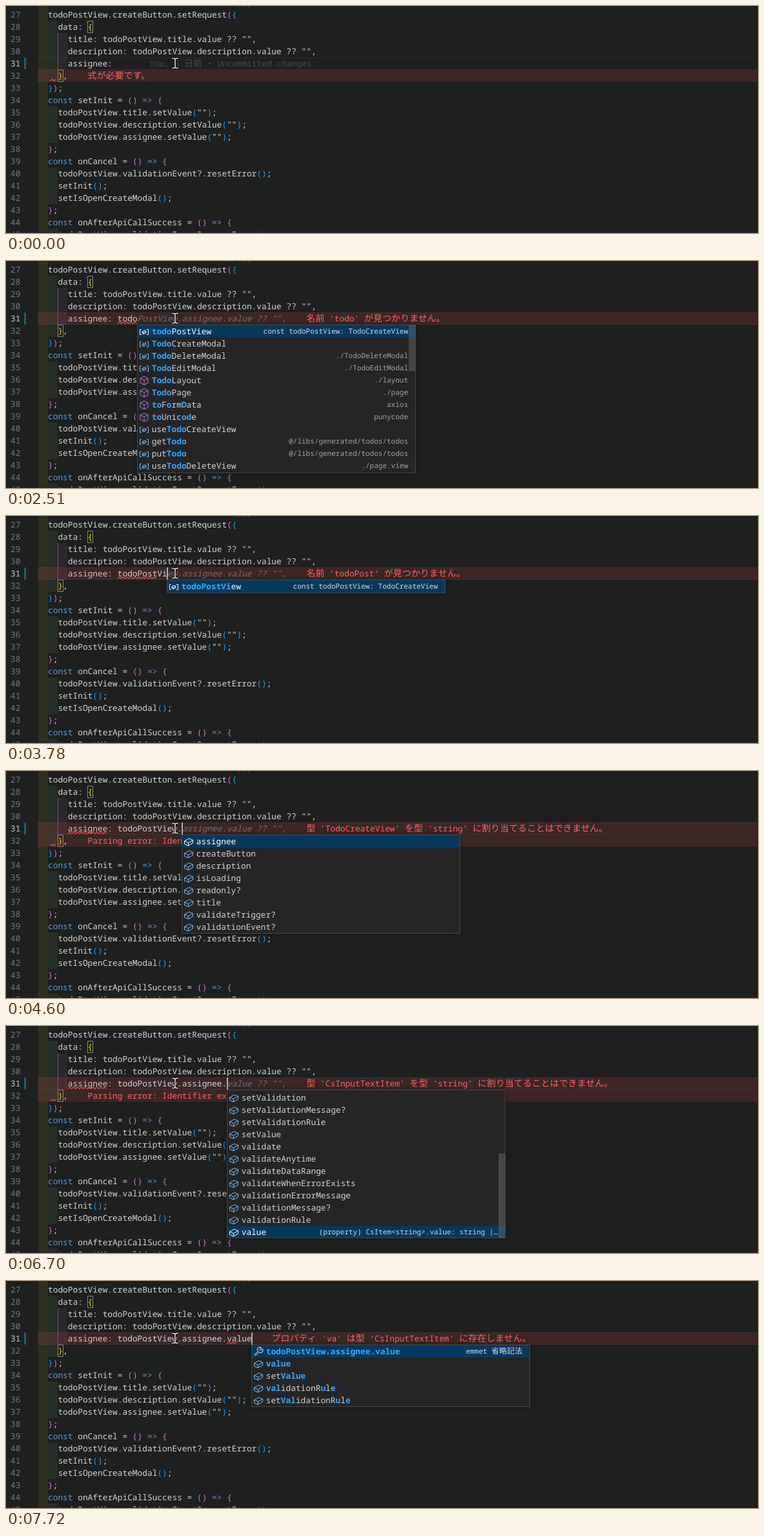
Recreate the animation shown at these times as an HTML page with a canvas. Size 1165x353 px, loop 8000 ms.

```html
<!DOCTYPE html>
<html lang="ja">
<head>
<meta charset="utf-8">
<style>
html, body { margin: 0; height: 100%; overflow: hidden; background: #1e1f1f; }
canvas { display: block; }
</style>
</head>
<body>
<canvas id="stage" width="1165" height="353"></canvas>
<script>
const ctx = document.getElementById('stage').getContext('2d');
const LOOP = 8000, W = 1165, H = 353, ROW = 19, CELL = 7.7, LEFT = 49.6;
const TEXT = '#d4d4d4', RED = '#ff6464', MATCH = '#2aaaff';
const BRACKETS = ['#ffd700', '#da70d6', '#179fff'];
const BANDS = ['rgba(255,255,64,.07)', 'rgba(127,255,127,.07)', 'rgba(255,127,255,.07)'];
const lineTop = line => 80 + (line - 31) * ROW;
const colX = col => LEFT + col * CELL;

const code = `  const todoPostView = useTodoCreateView();
  todoPostView.createButton.setRequest({
    data: {
      title: todoPostView.title.value ?? "",
      description: todoPostView.description.value ?? "",
      assignee:
    },
  });
  const setInit = () => {
    todoPostView.title.setValue("");
    todoPostView.description.setValue("");
    todoPostView.assignee.setValue("");
  };
  const onCancel = () => {
    todoPostView.validationEvent?.resetError();
    setInit();
    setIsOpenCreateModal();
  };
  const onAfterApiCallSuccess = () => {
    todoPostView.validationEvent?.resetError();`.split('\n');
const suggestion = 'todoPostView.assignee.value ?? "",';

// Each row: icon, label (matched letters between *), optional detail.
const rows = text => text.trim().split('\n').map(row => {
  const [label, detail = ''] = row.trim().slice(2).split(/\|(.*)/);
  return { icon: row.trim()[0], label, detail };
});
const own = 'v todoPostView|const todoPostView: TodoCreateView\n';
const tList = rows(own + `k this
  k throw
  m toString
  v toolbar
  v top
  k true
  k try
  k type
  k typeof
  m table|console
  v taintObjectReference|next/dist/server/app-render/entry…`);
const todoList = rows(own + `v TodoCreateModal
  v TodoDeleteModal|./TodoDeleteModal
  v TodoEditModal|./TodoEditModal
  m TodoLayout|./layout
  m TodoPage|./page
  m *to*F*o*rm*D*ata|axios
  m *to*Unic*od*e|punycode
  v useTodoCreateView
  v getTodo|@/libs/generated/todos/todos
  v putTodo|@/libs/generated/todos/todos
  v useTodoDeleteView|./page.view`);
const posList = rows(own + `v getGet*Todo*Query*Op*tion*s*|@/libs/generated/todos/todos
  v getList*Todo*Query*Op*tion*s*|@/libs/generated/todos/todos
  v getPut*Todo*Mutation*Op*tion*s*|@/libs/generated/todos/tod…
  v getPost*Todo*Mutation*Op*tion*s*|@/libs/generated/todos/to…
  v getDelete*Todo*Mutation*Op*tion*s*|@/libs/generated/todos/…`);
const viewList = rows(`f assignee
  f createButton
  f description
  f isLoading
  f readonly?
  f title
  f validateTrigger?
  f validationEvent?`);
const valueRow = 'f value|(property) CsItem<string>.value: string |…';
const validators = `f validate
  f validateAnytime
  f validateDataRange
  f validateWhenErrorExists
  f validationErrorMessage
  f validationMessage?
  f validationRule\n`;
const setters = `f setValidation
  f setValidationMessage?
  f setValidationRule
  f setValue\n`;
const itemList = rows(setters + validators + valueRow);
const valList = rows(valueRow + '\n' + validators + setters);
const valueList = rows(`w *todoPostView.assignee.value*|emmet 省略記法
  f value
  f setValue
  f *val*idationR*u*l*e*
  f set*Val*idationR*u*l*e*`);

const notFound = name => `名前 '${name}' が見つかりません。`;
const notString = name => `型 '${name}' を型 'string' に割り当てることはできません。`;
const parsing = { err32: 'Parsing error: Identifier expected.', wave32: 1 };
const clean32 = { err32: '', wave32: 0 };

// Changes of editor state; each one adds to those before it.
const steps = [
  [0, { typed: '', caret: 0, blame: 1, err32: '式が必要です。', wave32: 1 }],
  [150, { caret: 1 }],
  [690, { caret: 0 }],
  [1270, { typed: 't', caret: 1 }],
  [1420, { blame: 0, list: tList, thumb: [100, 19], wave32: 0 }],
  [1540, { ghost: 1 }],
  [1660, { typed: 'to', list: todoList, thumb: [100, 45] }],
  [1810, { typed: 'tod', thumb: [100, 60] }],
  [2080, { typed: 'todo', thumb: [100, 71] }],
  [2510, { caret: 0, err31: notFound('todo'), wave31: [16, 4], ...clean32 }],
  [2810, { typed: 'todoP', caret: 1, bulb: 1, list: posList, thumb: 0 }],
  [2940, { typed: 'todoPo' }],
  [3090, { typed: 'todoPos' }],
  [3240, { typed: 'todoPost', list: posList.slice(0, 1) }],
  [3510, { bulb: 0, err31: notFound('todoPost'), wave31: [16, 8] }],
  [3630, { typed: 'todoPostV' }],
  [3780, { typed: 'todoPostVi' }],
  [3900, { typed: 'todoPostView' }],
  [4330, { err31: notString('TodoCreateView') }],
  [4450, { wave31: [6, 8] }],
  [4600, { typed: 'todoPostView.', list: viewList, ...parsing }],
  [5130, { caret: 0 }],
  [5530, { typed: 'todoPostView.a', caret: 1, wave32: 0 }],
  [5650, { typed: 'todoPostView.assignee', list: 0 }],
  [6110, { caret: 0, err31: notString('CsInputTextItem'), ...clean32 }],
  [6550, { typed: 'todoPostView.assignee.', caret: 1 }],
  [6700, { list: itemList, selected: 11, shift: 2, thumb: [198, 132], ...parsing }],
  [6980, { typed: 'todoPostView.assignee.val', list: valList, selected: 0, shift: 0, thumb: 0, ...clean32 }],
  [7420, { err31: "プロパティ 'va' は型 'CsInputTextItem' に存在しません。", wave31: [38, 2] }],
  [7570, { typed: 'todoPostView.assignee.valu', list: valueList }],
  [7720, { typed: 'todoPostView.assignee.value', ghost: 0 }]
];

const icons = {
  v: ['#75beff', 'M4 4.5H1.5v8H4M12 4.5h2.5v8H12M5 8l3.5-2 2.5 1.2v2.4l-3.5 1.9L5 10.3zM5 8l2.5 1.2L11 7.2M7.5 9.2v2.3'],
  k: ['#cccccc', 'M1 3.5h7M10 3.5h5M1 6.5h5M8 6.5h4M1 9.5h3M6 9.5h9M1 12.5h7M10 12.5h4'],
  m: ['#b180d7', 'M8 1.5l6 3v7l-6 3-6-3v-7zM2 4.5l6 3 6-3M8 7.5v7'],
  f: ['#75beff', 'M1.5 7l7-4 6 2.5V10l-7 4-6-2.5zM1.5 7l6 2.5 7-4M7.5 9.5V14'],
  w: ['#d4d4d4', 'M2 12.5L7.5 7a3.5 3.5 0 0 1 5-5L10 4.5 11.500 6 14 3.5a3.5 3.5 0 0 1-5 5L3.5 14z']
};

function rect(x, y, w, h, color) {
  ctx.fillStyle = color;
  ctx.fillRect(x, y, w, h);
}
function stroke(path, color, width = 1) {
  ctx.strokeStyle = color;
  ctx.lineWidth = width;
  ctx.stroke(new Path2D(path));
}

const runs = text => text.match(/[\u3000-\u9fff]+|[^\u3000-\u9fff]+/g) || [];
const isWide = run => /[\u3000-\u9fff]/.test(run);
const widthOf = (text, size) =>
  runs(text).reduce((sum, run) => sum + run.length * size * (isWide(run) ? 1 : 0.55), 0);

// Draws mixed Latin and Japanese text and returns its right end.
function print(text, x, y, color = TEXT, style = '', size = 14) {
  ctx.fillStyle = color;
  for (const run of runs(text)) {
    ctx.font = isWide(run)
      ? `${size}px "Noto Sans CJK JP", "Noto Sans CJK", sans-serif`
      : `${style} ${size * 0.55 / 0.6}px "Noto Sans Mono", monospace`;
    ctx.fillText(run, x, y);
    x += widthOf(run, size);
  }
  return x;
}

function wave(col, count, line) {
  const x = colX(col), y = lineTop(line) + 16;
  let path = `M${x} ${y + 1.5}`;
  for (let i = 1; i * 3 <= count * CELL; i++) path += `L${x + i * 3} ${y + (i % 2 ? -1 : 1.5)}`;
  stroke(path, '#f14c4c', 1.1);
}

function drawCode() {
  let depth = 1;
  code.forEach((text, i) => {
    const line = 26 + i, y = lineTop(line), indent = text.search(/\S/);
    for (let b = 0; b < indent / 2; b++) rect(Math.round(colX(b * 2)), y, 15, ROW, BANDS[b]);
    const number = String(line);
    print(number, 22.5 - number.length * CELL, y + 14, line === 31 ? '#cccccc' : '#747a80');
    let x = colX(indent);
    for (const token of text.trim().match(/const\b|=>|[(){}]|[^(){}=]+|=/g)) {
      let color = TEXT;
      if (/[({]/.test(token)) color = BRACKETS[depth++ % 3];
      else if (/[)}]/.test(token)) color = BRACKETS[--depth % 3];
      else if (token === 'const' || token === '=>') color = '#569cd6';
      x = print(token, x, y + 14, color);
    }
  });
  rect(80, lineTop(29), 1, ROW * 3, '#6a5a60');
  stroke('M126.5 23.5h8v18h-8zM80.5 99.5h8v18h-8z', '#888888');
}

function errorLine(line, endCol, message) {
  if (!message) return;
  rect(49, lineTop(line), W, ROW, 'rgba(228,85,84,.15)');
  print(message, colX(endCol + 4), lineTop(line) + 14, RED);
}

function drawList(s, left) {
  const height = s.list.length * ROW + (s.list.length === 12 ? 3 : 2);
  ctx.save();
  ctx.shadowColor = 'rgba(0,0,0,.36)';
  ctx.shadowBlur = 8;
  rect(left, 99, 432, height, '#454545');
  ctx.restore();
  rect(left + 1, 100, 430, height - 2, '#252526');
  const word = s.typed.split('.').pop().toLowerCase();
  s.list.forEach((item, i) => {
    const y = 100 + (s.shift || 0) + i * ROW, active = i === (s.selected || 0);
    if (active) rect(left + 1, y, 430, Math.min(ROW, 98 + height - y), '#04395e');
    const [color, path] = icons[item.icon], textColor = active ? '#ffffff' : TEXT;
    ctx.save();
    ctx.translate(left + 3, y + 2);
    stroke(path, active ? '#ffffff' : color);
    ctx.restore();

    let label = item.label;
    const at = label.toLowerCase().indexOf(word);
    if (word && at >= 0 && !label.includes('*')) {
      const end = at + word.length;
      label = `${label.slice(0, at)}*${label.slice(at, end)}*${label.slice(end)}`;
    }
    let x = left + 22.7;
    label.split('*').forEach((part, k) => {
      x = k % 2 ? print(part, x, y + 14, MATCH, 'bold') : print(part, x, y + 14, textColor);
    });
    if (item.detail) {
      const right = left + (/^@.*…$/.test(item.detail) ? 415 : 420);
      print(item.detail, right - widthOf(item.detail, 12), y + 13, active ? '#d4dbe2' : '#a5a5a5', '', 12);
    }
  });
  if (s.thumb) rect(left + 421, s.thumb[0], 10, s.thumb[1], 'rgba(121,121,121,.4)');
}

function drawPointer() {
  const beam = 'M257.5 81.5h3l1.5 1 1.5-1h3M262 82.5v13M257.5 96.5h3l1.5-1 1.5 1h3';
  stroke(beam, '#000000', 3.4);
  stroke(beam, '#ffffff', 1.4);
}

function draw(time) {
  const s = Object.assign({}, ...steps.filter(step => step[0] <= time).map(step => step[1]));
  const caretCol = 16 + s.typed.length, caretX = colX(caretCol);
  rect(0, 0, W, H, '#1e1f1f');
  rect(50, 80, W, 1, '#2a2a2a');
  rect(50, 98, W, 1, '#2a2a2a');
  drawCode();

  ctx.save();
  ctx.beginPath();
  ctx.rect(28, 80, 3, ROW);
  ctx.clip();
  for (let y = 78; y < 104; y += 4) stroke(`M27 ${y + 4}l5-5`, '#1b81a8', 1.7);
  ctx.restore();

  errorLine(31, s.ghost ? 16 + suggestion.length : caretCol, s.err31);
  errorLine(32, 6, s.err32);
  print(s.typed, colX(16), 94);
  if (s.ghost) print(suggestion.slice(s.typed.length), caretX, 94, '#737373', 'italic');
  if (s.blame) print('You, 6 日前 • Uncommitted changes', caretX + 49.4, 94, '#4b4b4b');
  if (s.wave31) wave(...s.wave31, 31);
  if (s.wave32) wave(2.4, 1.3, 32);
  if (s.bulb) {
    ctx.fillStyle = '#3794ff';
    ctx.beginPath();
    ctx.arc(56, 86, 4.7, 0, 7);
    ctx.fill();
    rect(54, 90, 4, 4, '#3794ff');
    stroke('M59 91l4 3M63 91l-4 3', '#a8cfff');
  }
  if (s.caret) rect(Math.floor(caretX), 80, 2, ROW, '#aeafad');
  if (s.list) drawList(s, Math.floor(caretX));
  drawPointer();
  rect(0, H - 1, W, 1, '#2a1d30');
  rect(W - 1, 0, 1, H, '#2a1d30');
}

ctx.textRendering = 'geometricPrecision';
function tick() {
  draw(performance.now() % LOOP);
  requestAnimationFrame(tick);
}
tick();
</script>
</body>
</html>
```
